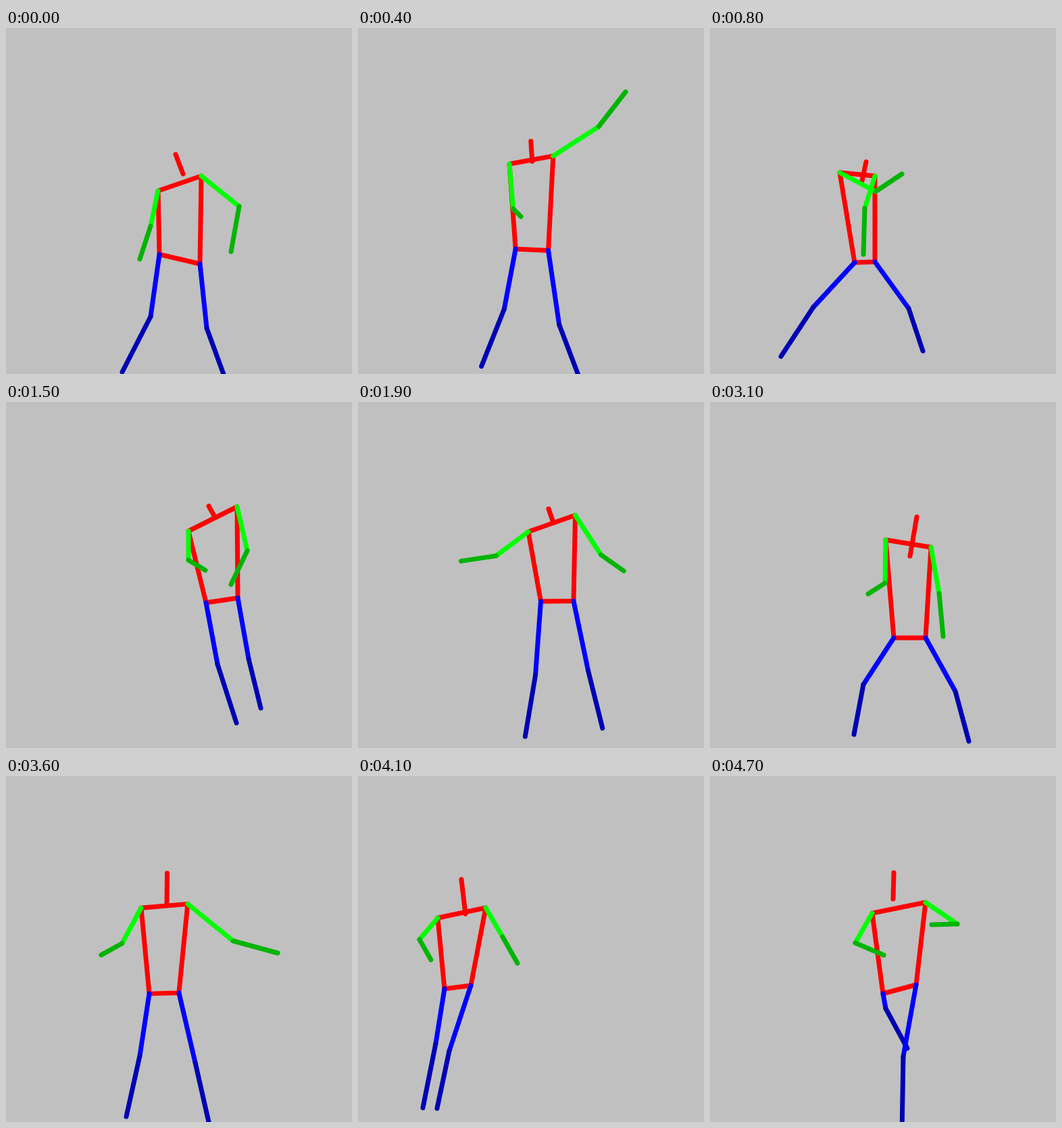
An HTML page with a canvas that plays this animation: 512 px wide and 512 px high, repeating every 4800 ms.

```html
<!DOCTYPE html>
<html lang="en">
<head>
<meta charset="utf-8">
<title>Dancing stick figure</title>
<style>
  html, body { margin: 0; width: 100%; height: 100%; overflow: hidden; background: #c0c0c0; }
  canvas { display: block; width: 512px; height: 512px; }
</style>
</head>
<body>
<canvas id="stage" width="512" height="512"></canvas>
<script>
const LOOP = 4800, STEP = 100;
const ctx = document.getElementById('stage').getContext('2d');

// Each limb has its own track of [time, flat x/y list].
const tracks = {};
function key(time, limbs) {
  for (const name in limbs) (tracks[name] ||= []).push([time, limbs[name]]);
}

// neck: top, base. torso: left shoulder, right shoulder, right hip, left hip.
// arms: elbow, hand. legs: knee, foot.
key(0, {
  neck: [251, 187, 262, 216],
  torso: [225, 241, 289, 219, 287, 349, 227, 335],
  armL: [214, 293, 198, 342], armR: [345, 264, 333, 331],
  legL: [214, 427, 172, 509], legR: [297, 444, 324, 518]
});
key(300, {
  neck: [262, 160, 266, 190],
  torso: [232, 198, 300, 182, 291, 325, 238, 322],
  armR: [346, 114, 364, 39],
  legL: [222, 412, 186, 500]
});
key(500, { armR: [366, 178, 428, 150] });
key(600, {
  armR: [345, 222, 405, 200],
  legL: [205, 424, 176, 502], legR: [298, 436, 328, 514]
});
key(800, {
  neck: [231, 198, 225, 226],
  torso: [192, 214, 244, 219, 244, 346, 214, 347],
  armL: [245, 242, 284, 216], armR: [229, 267, 227, 335],
  legL: [153, 413, 105, 486], legR: [294, 415, 315, 478]
});
key(1200, { legL: [222, 412, 169, 500], legR: [320, 420, 342, 512] });
key(1500, {
  neck: [300, 154, 309, 170],
  torso: [270, 191, 342, 155, 343, 290, 296, 297],
  armL: [270, 234, 295, 249], armR: [357, 220, 333, 270],
  legL: [313, 388, 341, 475], legR: [359, 380, 377, 453]
});
key(1700, { armR: [362, 222, 390, 258] });
key(2000, {
  armL: [188, 226, 117, 232], armR: [358, 228, 395, 246],
  legL: [250, 408, 224, 500], legR: [336, 402, 358, 490]
});
key(2300, {
  neck: [264, 162, 268, 184],
  torso: [234, 193, 301, 180, 295, 299, 245, 293],
  armL: [229, 231, 220, 246], armR: [316, 245, 298, 273],
  legL: [224, 373, 205, 450], legR: [306, 365, 322, 441]
});
key(2700, { legL: [222, 410, 176, 490], legR: [344, 412, 376, 510] });
key(3100, {
  neck: [306, 170, 296, 228],
  torso: [260, 204, 327, 215, 319, 349, 272, 349],
  armL: [259, 268, 234, 284], armR: [339, 283, 345, 347],
  legL: [227, 418, 213, 492], legR: [363, 428, 383, 502]
});
key(3400, { armL: [204, 250, 154, 262] });
key(3600, {
  armR: [336, 244, 402, 262],
  legL: [198, 414, 178, 504], legR: [280, 424, 300, 512]
});
key(3900, {
  neck: [198, 128, 203, 170],
  torso: [164, 190, 234, 174, 218, 304, 176, 306]
});
key(4100, {
  neck: [153, 153, 159, 204],
  torso: [118, 210, 189, 195, 167, 310, 128, 315],
  armL: [91, 242, 108, 272], armR: [214, 238, 236, 277],
  legL: [115, 396, 96, 491], legR: [135, 407, 117, 492]
});
key(4500, { armR: [338, 232, 397, 218] });
key(4700, {
  neck: [272, 143, 271, 182],
  torso: [240, 203, 319, 187, 305, 309, 256, 322],
  armL: [215, 247, 257, 265], armR: [366, 219, 328, 220],
  legL: [260, 344, 292, 403], legR: [286, 415, 284, 530]
});

function pose(name, time) {
  const track = tracks[name];
  const next = track.findIndex(([t]) => t >= time);
  const [t1, b] = track[next];
  if (t1 === time) return b;
  const [t0, a] = track[next - 1];
  const k = (time - t0) / (t1 - t0);
  return a.map((v, i) => v + (b[i] - v) * k);
}

function line(color, points, closed) {
  ctx.strokeStyle = color;
  ctx.beginPath();
  for (let i = 0; i < points.length; i += 2) ctx.lineTo(points[i], points[i + 1]);
  if (closed) ctx.closePath();
  ctx.stroke();
}

function limb(root, joints, upper, lower) {
  line(upper, [...root, ...joints.slice(0, 2)]);
  line(lower, joints);
}

function draw(time) {
  const at = name => pose(name, time);
  const torso = at('torso');
  const corner = i => torso.slice(i * 2, i * 2 + 2);
  ctx.fillStyle = '#c0c0c0';
  ctx.fillRect(0, 0, 512, 512);
  ctx.lineWidth = 7;
  ctx.lineCap = ctx.lineJoin = 'round';
  line('#f00', torso, true);
  line('#f00', at('neck'));
  limb(corner(0), at('armL'), '#0f0', '#00b400');
  limb(corner(1), at('armR'), '#0f0', '#00b400');
  limb(corner(3), at('legL'), '#00f', '#0000b4');
  limb(corner(2), at('legR'), '#00f', '#0000b4');
}

const start = performance.now();
function tick() {
  const time = (performance.now() - start) % LOOP;
  draw(Math.floor(time / STEP) * STEP);
  requestAnimationFrame(tick);
}
tick();
</script>
</body>
</html>
```
